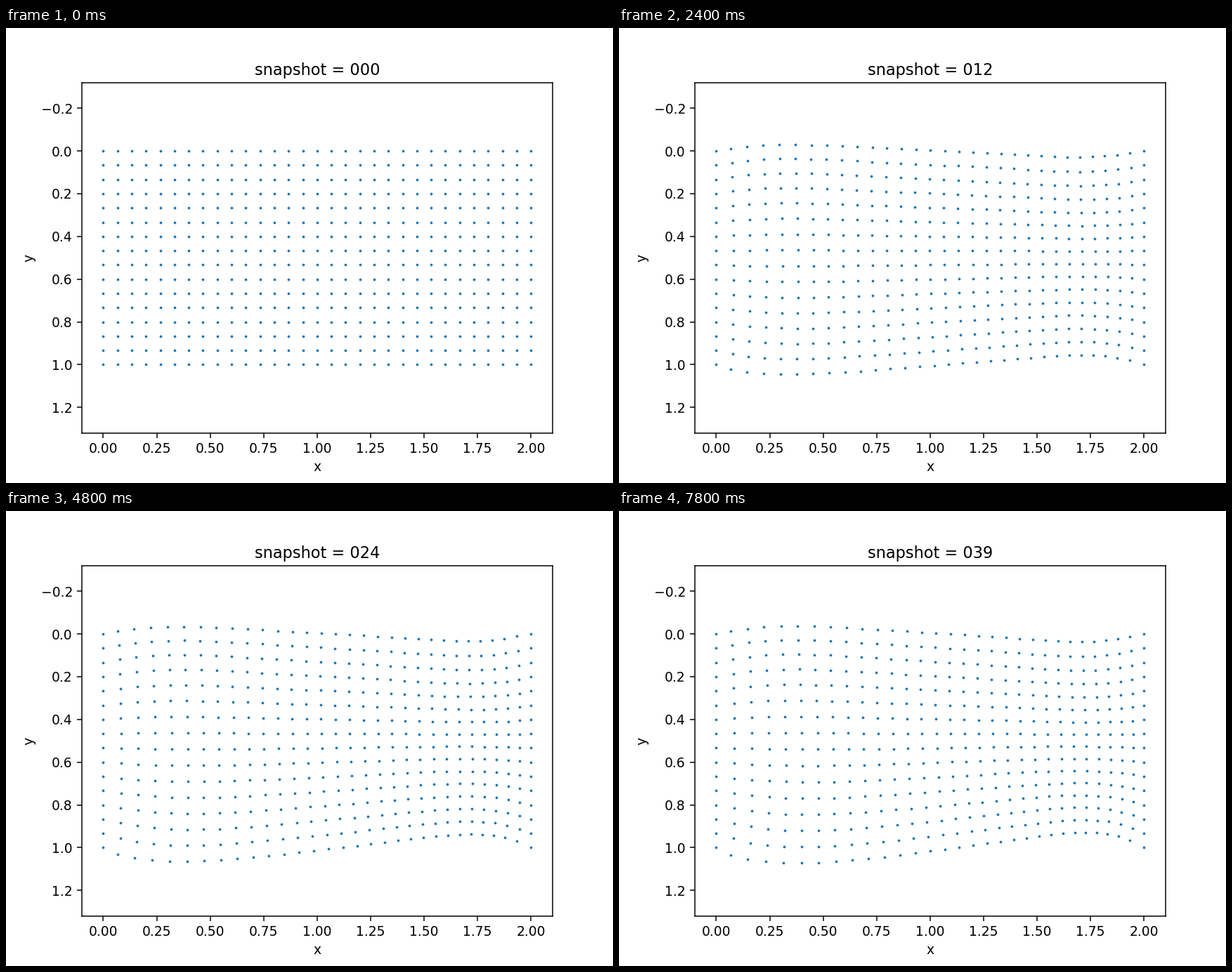
Write a matplotlib script that moves like this. It is 864 px wide and 648 px high and loops after 8 s.

```python
import numpy as np
import matplotlib.pyplot as plt
from matplotlib.animation import FuncAnimation

NX, NY, FRAMES = 30, 15, 40
H = 1 / NY
DIFFUSION = 0.0173      # area per snapshot
POISSON = 0.25
PEAK_SHIFT = 0.096      # horizontal shift of the middle at the end
SIGNS = np.array([(-1, -1), (1, -1), (1, 1), (-1, 1)])

xs, ys = np.meshgrid(np.arange(NX + 1) * H, np.arange(NY + 1) * H)
cx, cy = np.meshgrid((np.arange(NX) + 0.5) * H, (np.arange(NY) + 0.5) * H)


def chain(n, drained):
    """1D diffusion operator, closed ends unless the first is drained."""
    m = 2 * np.eye(n) - np.eye(n, k=1) - np.eye(n, k=-1)
    m[0, 0] = 3 if drained else 1
    m[-1, -1] = 1
    return m


def blob(x, y, width):
    b = np.exp(-((cx - x) ** 2 + (cy - y) ** 2) / (2 * width ** 2))
    return (b / b.sum()).ravel()


def well_pair(width):
    y = 6.5 * H
    return blob(2.5 * H, y, width) - blob(26.5 * H, y, width)


def pressures():
    lap = (np.kron(np.eye(NY), chain(NX, False))
           + np.kron(chain(NY, True), np.eye(NX)))
    step = np.linalg.inv(np.eye(NX * NY) + DIFFUSION / H ** 2 * lap)
    point, wide = well_pair(0.01), well_pair(0.15)
    p = np.zeros((FRAMES, NX * NY))
    for n in range(1, FRAMES):
        w = min(1, np.exp(-(n - 3) / 1.5))
        p[n] = step @ (p[n - 1] + w * point + (1 - w) * wide)
    return p


def element_stiffness():
    nu = POISSON
    c = np.array([[1 - nu, nu, 0], [nu, 1 - nu, 0], [0, 0, 0.5 - nu]])
    k = np.zeros((8, 8))
    for a, b in SIGNS / np.sqrt(3):
        dx = SIGNS[:, 0] * (1 + SIGNS[:, 1] * b) / 4
        dy = SIGNS[:, 1] * (1 + SIGNS[:, 0] * a) / 4
        strain = np.zeros((3, 8))
        strain[0, 0::2] = strain[2, 1::2] = dx
        strain[1, 1::2] = strain[2, 0::2] = dy
        k += strain.T @ c @ strain
    return k


def displacements():
    """Elastic sheet clamped at both sides, swollen by the pressure."""
    p = pressures()
    size = 2 * xs.size
    stiff, load = np.zeros((size, size)), np.zeros((size, FRAMES))
    ke, push = element_stiffness(), SIGNS.ravel()
    for j in range(NY):
        for i in range(NX):
            a = j * (NX + 1) + i
            nodes = np.array([a, a + 1, a + NX + 2, a + NX + 1])
            dof = np.stack([2 * nodes, 2 * nodes + 1], axis=1).ravel()
            stiff[np.ix_(dof, dof)] += ke
            load[dof] += np.outer(push, p[:, j * NX + i])
    column = np.repeat(np.tile(np.arange(NX + 1), NY + 1), 2)
    free = np.flatnonzero((column > 0) & (column < NX))
    u = np.zeros((size, FRAMES))
    u[free] = np.linalg.solve(stiff[np.ix_(free, free)], load[free])
    u = u.T.reshape(FRAMES, NY + 1, NX + 1, 2)
    return u * PEAK_SHIFT / u[-1, 7, NX // 2, 0]


shift = displacements()

fig, ax = plt.subplots(figsize=(6.4, 4.8), dpi=135)
dots, = ax.plot([], [], ".", ms=2, color="tab:blue")
half = 1.1 * (0.77 * 4.8) / (0.775 * 6.4)
ax.set(xlim=(-0.1, 2.1), ylim=(0.5 + half, 0.5 - half), xlabel="x", ylabel="y")
title = ax.set_title("")


def draw(n):
    dots.set_data((xs + shift[n, ..., 0]).ravel(), (ys + shift[n, ..., 1]).ravel())
    title.set_text(f"snapshot = {n:03d}")
    return dots, title


anim = FuncAnimation(fig, draw, frames=FRAMES, init_func=lambda: draw(0),
                     interval=200, repeat=True, repeat_delay=0)
plt.show()
```
